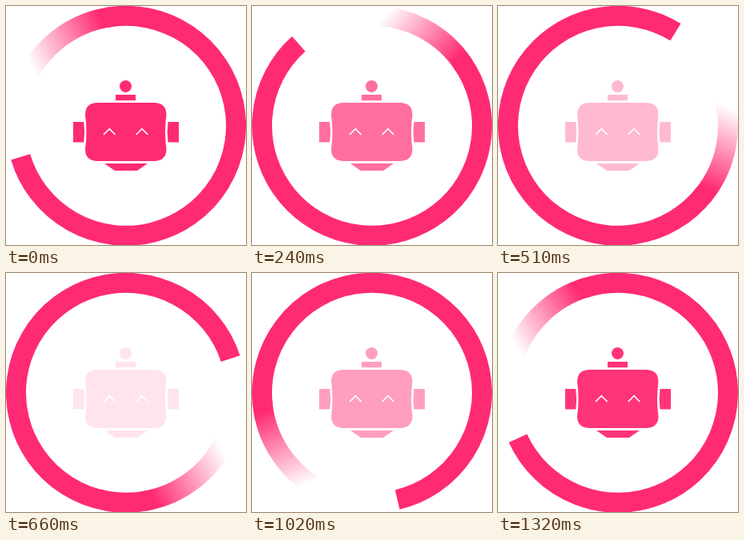
Recreate the animation shown at these times as an HTML page. Size 300 by 299 pixels, loop 1350 ms.

```html
<!DOCTYPE html>
<html lang="en">
<head>
<meta charset="utf-8">
<title>Robot loader</title>
<style>
  html, body { margin: 0; width: 100%; height: 100%; overflow: hidden; background: #fff; }
  svg { display: block; width: 300px; height: 299px; }
</style>
</head>
<body>
<svg viewBox="0 0 300 299">
  <defs>
    <linearGradient id="tail" gradientUnits="userSpaceOnUse" x1="-68.9" y1="32.1" x2="25.4" y2="-11.8">
      <stop offset="0" stop-color="#ff2a74" stop-opacity="0"/>
      <stop offset="1" stop-color="#ff2a74"/>
    </linearGradient>
  </defs>
  <g id="ring" fill="none" stroke-width="25">
    <path stroke="url(#tail)" d="M-126.6-53.7A137.5 137.5 0 0 1-19.1-136.2"/>
    <path stroke="#ff2a74" d="M-23.9-135.4A137.5 137.5 0 1 1-131.8 39.05"/>
  </g>
  <g id="robot" fill="#ff2a74">
    <circle cx="149.5" cy="100.5" r="7.5"/>
    <path d="M137 111h25v7.2h-25z"/>
    <path d="M115 121H184.500Q200.500 121 200.500 136Q197.500 158 200.500 179Q200.500 194 184.500 194H115Q99 194 99 179Q102 158 99 136Q99 121 115 121Z"/>
    <path d="M84 145H97.300Q99 158 97.300 170.500H84ZM216 145H202.500Q200.800 158 202.500 170.500H216Z"/>
    <path d="M123 197H177L164 206H136Z"/>
    <path fill="none" stroke="#fff" stroke-width="1.7" d="M122 161l7.300-7.300 7.300 7.300M162.700 161l7.300-7.300 7.300 7.300"/>
  </g>
</svg>
<script>
  const LOOP = 1350, STEP = 30, FADE_OUT = 750;
  const ring = document.getElementById('ring');
  const robot = document.getElementById('robot');
  const start = performance.now();

  function draw() {
    const t = Math.floor(((performance.now() - start) % LOOP) / STEP) * STEP;
    const turn = t / LOOP;
    const angle = 360 * turn + 1.2 * (1 - Math.cos(2 * Math.PI * turn));
    ring.setAttribute('transform', `translate(150 149.8) rotate(${angle})`);
    robot.setAttribute('opacity', t < FADE_OUT ? 1 - t / FADE_OUT : (t - FADE_OUT) / (LOOP - FADE_OUT));
    requestAnimationFrame(draw);
  }
  draw();
</script>
</body>
</html>
```
